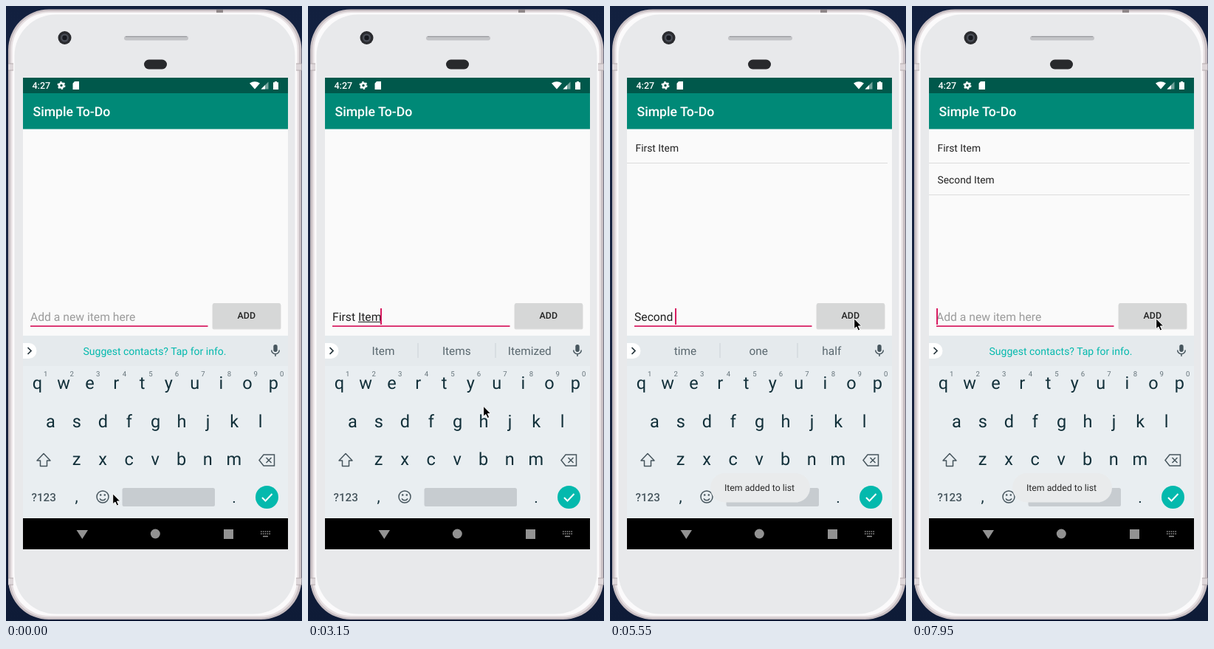
Write an HTML page that moves like this. It is 401 by 832 pixels and loops after 8 s.

```html
<!DOCTYPE html>
<html lang="en">
<head>
<meta charset="utf-8">
<title>To-do list on a phone</title>
<style>
html, body { margin: 0; width: 100%; height: 100%; overflow: hidden; background: #12203f; }
svg { display: block; width: 401px; height: 832px; font-family: Roboto, sans-serif; }
text { white-space: pre; text-rendering: geometricPrecision; }
.mid { text-anchor: middle; }
.med { font-weight: 500; }
.line { fill: none; stroke: #47565e; stroke-width: 1.5; }
</style>
</head>
<body>
<svg viewBox="0 0 401 832">
  <defs>
    <linearGradient id="night" x2="0" y2="1">
      <stop offset="0" stop-color="#12203f"/><stop offset=".5" stop-color="#1b2644"/><stop offset="1" stop-color="#0e1b37"/>
    </linearGradient>
  </defs>

  <!-- Phone body -->
  <rect width="401" height="832" fill="url(#night)"/>
  <rect x="3" y="4.500" width="397.500" height="825.500" rx="55" fill="#c8bfc3"/>
  <rect x="6" y="7" width="391" height="820.500" rx="52" fill="#e6dfe1"/>
  <rect x="8.500" y="9" width="386" height="816" rx="50" fill="#fbfafb"/>
  <rect x="11.500" y="11.500" width="380" height="811" rx="56" fill="#e8e9eb"/>
  <path d="M3 78h7v9H3zM393 78h7.500v9H393zM3 774h7v9H3zM393 774h7.500v9H393z" fill="#ded7da"/>
  <path d="M3 78h7M3 87h7M393 78h7.500M393 87h7.500M3 774h7M3 783h7M393 774h7.500M393 783h7.500" stroke="#b5acae"/>
  <rect x="285" y="5" width="9" height="4" fill="#8f8789"/>
  <circle cx="79.500" cy="43" r="9" fill="#2a2b2f"/>
  <circle cx="79.500" cy="43" r="5.500" fill="#4a4e57"/>
  <circle cx="79.500" cy="43" r="3.200" fill="#17191f"/>
  <rect x="160" y="40.500" width="87" height="6" rx="3" fill="#c3c4c7"/>
  <path d="M162 41.500h83" stroke="#94969a"/>
  <rect x="187" y="72.500" width="31" height="13" rx="6.500" fill="#28292c"/>

  <!-- Status and title bars -->
  <rect x="23" y="97" width="359" height="638" fill="#fafafa"/>
  <rect x="23" y="97" width="359" height="21" fill="#00584b"/>
  <rect x="23" y="118" width="359" height="48.500" fill="#008977"/>
  <g fill="#fff">
    <text class="med" x="35.500" y="112.300" font-size="12.500">4:27</text>
    <circle cx="75" cy="107.500" r="3" fill="none" stroke="#fff" stroke-width="2.600"/>
    <circle cx="75" cy="107.500" r="4.700" fill="none" stroke="#fff" stroke-width="1.600" stroke-dasharray="2.460"/>
    <path d="M93 102h6v11h-8.500v-8.300zM330 104.500q7-4.500 14 0l-7 8z"/>
    <path d="M355.500 102.500v10h-10z" opacity=".45"/>
    <path d="M351 107v5.500h-5.500z"/>
    <path d="M364 102h3v1.200h2v9.800h-7v-9.800h2z"/>
    <text class="med" x="36.600" y="149" font-size="17.650">Simple To-Do</text>
  </g>
  <g id="rows" fill="#212121" font-size="13.800"></g>

  <!-- Entry field and button -->
  <text id="entry" x="33" y="426.300" font-size="15.700"></text>
  <path id="mark" stroke="#212121"/>
  <rect x="33" y="432.300" width="240.500" height="1.700" fill="#d81b60"/>
  <rect id="caret" y="409" width="2" height="22" fill="#d81b60"/>
  <rect x="279.500" y="403" width="93" height="34.500" rx="2" fill="#000" opacity=".13"/>
  <rect id="button" x="280" y="402" width="92" height="34" rx="2"/>
  <text class="mid med" x="325.800" y="423.200" font-size="12.400" fill="#212121">ADD</text>

  <!-- Keyboard -->
  <rect x="23" y="446" width="359" height="247" fill="#e9eef1"/>
  <rect x="23" y="446" width="359" height="41" fill="#e5eaed"/>
  <path d="M23 456h8a10.500 10.500 0 0 1 0 21h-8z" fill="#fff"/>
  <path class="line" d="M29.500 462l4.500 4.500-4.500 4.500" style="stroke:#26353c;stroke-width:1.700"/>
  <g id="strip"></g>
  <rect x="362.300" y="458" width="5.400" height="10" rx="2.700" fill="#47565e"/>
  <path class="line" d="M359.700 465.500a5.300 5.300 0 0 0 10.600 0M365 471v3"/>
  <g id="keys" fill="#12303a"></g>
  <path class="line" d="M51 605.500l9 9.500h-4.500v7.500h-9V615H42z" stroke-linejoin="round"/>
  <path class="line" d="M349 607h14.500v15H349l-6-7.500zM352.500 611l7 7m0-7l-7 7"/>
  <text class="mid med" x="51.200" y="669.500" font-size="15.200" fill="#47565e">?123</text>
  <circle class="line" cx="131" cy="664" r="8"/>
  <path class="line" d="M127 666.300a4.500 4.500 0 0 0 8 0"/>
  <g fill="#47565e"><circle cx="128.200" cy="661.500" r="1.250"/><circle cx="133.800" cy="661.500" r="1.250"/></g>
  <rect x="157.500" y="652" width="125.500" height="25" rx="2.500" fill="#c7ccd0"/>
  <circle cx="353.500" cy="664.500" r="15.500" fill="#04b9ad"/>
  <path d="M347 665l4.500 4.500 9-9.500" fill="none" stroke="#fff" stroke-width="2"/>

  <!-- Navigation bar -->
  <rect x="23" y="693" width="359" height="42" fill="#000"/>
  <g fill="#929292">
    <path d="M95.500 709h15.500l-7.700 12zM295 708h13v13h-13z"/>
    <circle cx="202.300" cy="714" r="6.500"/>
  </g>
  <path d="M345 711h13M345 714h13" stroke="#929292" stroke-width="1.600" stroke-dasharray="1.600 1.250"/>
  <path d="M348 717.500h7" stroke="#929292" stroke-width="1.500"/>

  <g id="toast">
    <rect x="136" y="632" width="135" height="39.500" rx="19.700" fill="#e9ebec"/>
    <text class="mid" x="202.500" y="655.500" font-size="12.300" fill="#2b2b2b">Item added to list</text>
  </g>
  <path id="mouse" d="M0 0V14L3.200 11.200 5.500 16.300 8 15.200 5.700 10.200H10Z" fill="#000" stroke="#fff" stroke-width="1"/>
</svg>
<script>
const LOOP = 8000, TICK = 150, BLINK = 450, LEFT = 33;
const HINT = 'Add a new item here';
const $ = id => document.getElementById(id);
const pen = document.createElement('canvas').getContext('2d');

const label = (x, y, size, str, extra = '') =>
  `<text class="mid" x="${x}" y="${y}" font-size="${size}" ${extra}>${str}</text>`;

function width(str) {
  pen.font = '15.7px Roboto, sans-serif';
  return pen.measureText(str).width;
}

// [time, entry text, suggestions]; no suggestions shows the contacts prompt
const typing = [
  [-600, '', ''],
  [600, 'F', ''],
  [900, 'Fi', ''],
  [1200, 'Fir', 'Fir For Fire'],
  [1350, 'Firs', 'Firs First Fire'],
  [1650, 'First', 'First Firstly Firsthand'],
  [1800, 'First ', 'time one half'],
  [2100, 'First I', "I I'm It"],
  [2250, 'First It', "It It's Or"],
  [2550, 'First Ite', 'Item Items Itemized'],
  [2850, 'First Item', 'Item Items Itemized'],
  [3750, '', ''],
  [4500, 'S', 'S So See'],
  [4650, 'Se', 'Se See Send'],
  [4950, 'Sec', 'Sec Second Secret'],
  [5100, 'Seco', 'Second Seconds Secondary'],
  [5250, 'Secon', 'Second Seconds Secondary'],
  [5400, 'Second', 'Second Seconds Secondary'],
  [5550, 'Second ', 'time one half'],
  [5850, 'Second I', "I I'm It"],
  [6000, 'Second It', "It It's Or"],
  [6150, 'Second Ite', 'Item Items Itemized'],
  [6450, 'Second Item', 'Item Items Itemized'],
  [7050, '', '']
];
const added = [[3750, 'First Item'], [7050, 'Second Item']];

function buildKeys() {
  const rows = [['qwertyuiop', 42.5, 518], ['asdfghjkl', 60.3, 570], ['zxcvbnm', 95.5, 621]];
  let out = '';
  for (const [letters, x, y] of rows)
    [...letters].forEach((c, i) => out += label(x + 35.55 * i, y, 23.5, c));
  for (let i = 0; i < 10; i++)
    out += label(53.7 + 35.55 * i, 501, 9.6, (i + 1) % 10, 'fill="#65737a"');
  $('keys').innerHTML = out + label(95.5, 671, 21, ',') + label(309, 671.5, 21, '.');
}

function drawStrip(words) {
  if (!words) return label(201.5, 471.8, 14, 'Suggest contacts? Tap for info.', 'fill="#04b9ad"');
  return words.split(' ').map((w, i) => label([102, 201.3, 300.3][i], 472, 15.4, w, 'fill="#5a686f"')).join('')
    + '<path d="M149 456v20M254 456v20" stroke="#cbd2d6"/>';
}

function drawRows(t) {
  return added.filter(([at]) => t >= at).map(([, name], i) =>
    `<text x="34.6" y="${196.8 + 43 * i}">${name}</text>
     <path d="M23 ${212.5 + 43 * i}h353" stroke="#dcdcdc"/>`).join('');
}

function ramp(t, stops) {
  let value = 0;
  for (const [at, v] of stops) if (t >= at) value = v;
  return value;
}

const ease = p => p * p * (3 - 2 * p);

function render(ms) {
  const t = Math.floor(ms / TICK) * TICK;
  const [at, text, words] = typing.filter(s => s[0] <= t).pop();

  $('entry').textContent = text || HINT;
  $('entry').setAttribute('fill', text ? '#212121' : '#9b9b9b');
  const end = LEFT + width(text);
  const start = LEFT + width(text.slice(0, text.lastIndexOf(' ') + 1));
  $('mark').setAttribute('d', end > start ? `M${start} 427.5H${end}` : '');
  $('caret').setAttribute('x', Math.max(LEFT, Math.floor(end - .6)));
  $('caret').setAttribute('opacity', (t - at) % (2 * BLINK) < BLINK ? 1 : 0);

  $('strip').innerHTML = drawStrip(words);
  $('rows').innerHTML = drawRows(t);

  const pressed = added.some(([a]) => t >= a - TICK && t < a + TICK);
  $('button').setAttribute('fill', pressed ? '#b9baba' : '#d6d7d7');
  $('toast').setAttribute('opacity', ramp(t, [
    [3750, .13], [3900, .75], [4050, 1], [6300, .4], [6450, 0],
    [7050, .13], [7200, .75], [7350, 1]
  ]));

  const p = ease(Math.min(1, Math.max(0, (t - 2850) / 600)));
  $('mouse').setAttribute('transform', `translate(${144.7 + 186 * p} ${659.8 - 237 * p})`);
}

buildKeys();
const begin = performance.now();
let shown = -1;
function frame() {
  const ms = (performance.now() - begin) % LOOP;
  const step = Math.floor(ms / TICK);
  if (step !== shown) render(ms);
  shown = step;
  requestAnimationFrame(frame);
}
render(0);
frame();
</script>
</body>
</html>
```
